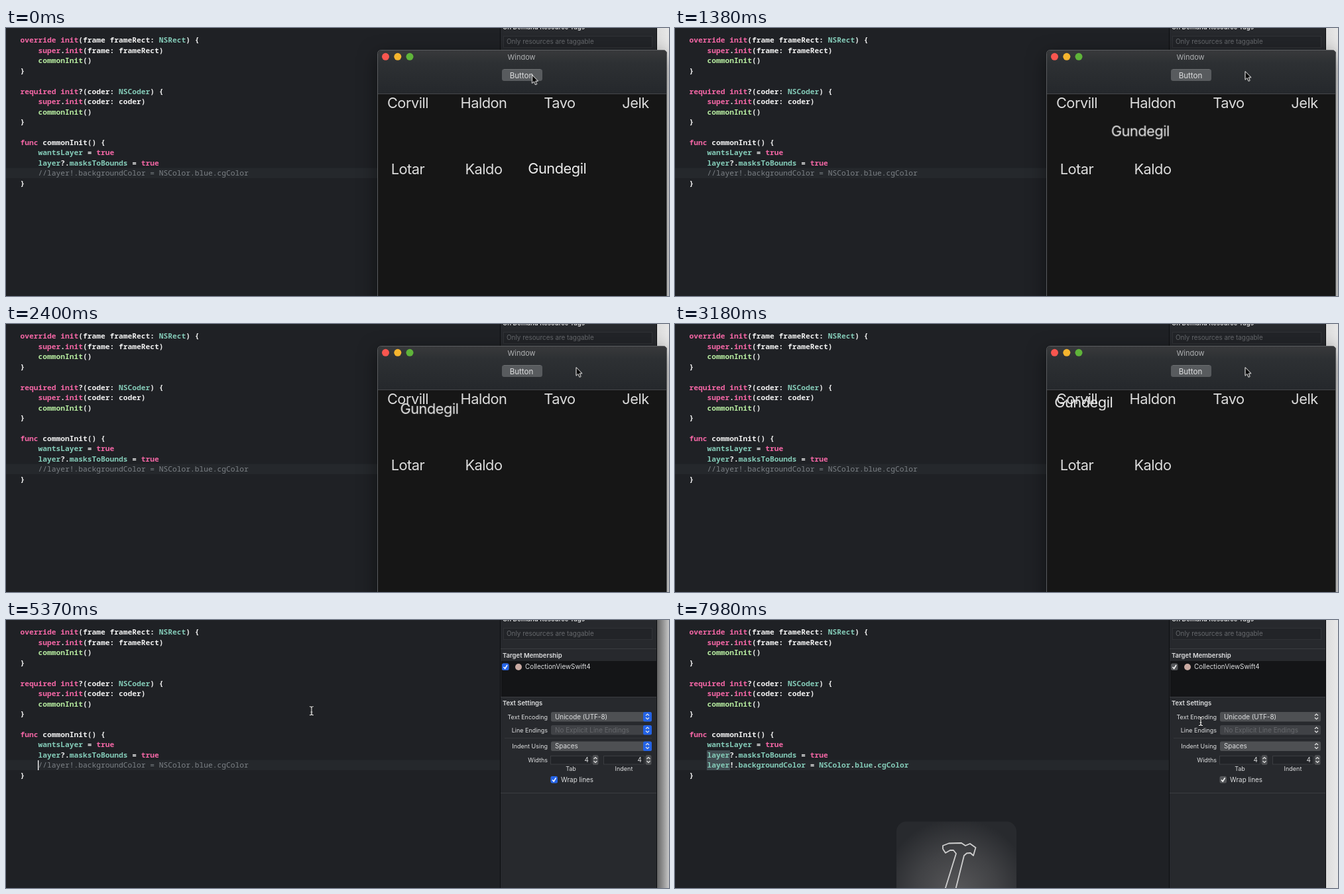
Recreate the animation shown at these times as an HTML page. Size 1000x405 px, loop 8000 ms.

```html
<!DOCTYPE html>
<html lang="en">
<head>
<meta charset="utf-8">
<title>Collection view editing</title>
<style>
html, body { margin: 0; width: 100%; height: 100%; overflow: hidden; background: #1f2125; }
svg { display: block; width: 1000px; height: 405px; }
text { font-family: Inter, "Open Sans", sans-serif; white-space: pre; fill: #dedfe0; }

.code text { font: 600 11.25px "Noto Sans Mono", "DejaVu Sans Mono", monospace; fill: #f0f0f0; }
.code .kw { fill: #f567a6; }
.code .sys { fill: #84cbb8; }
.code .call { fill: #b5ea9f; }
.code .note { fill: #7d8287; font-weight: 500; }

.head { font-size: 9.5px; font-weight: 600; }
.label { font-size: 9px; text-anchor: end; }
.caption { font-size: 9px; text-anchor: middle; }
.value { font-size: 9.9px; }
.dim { fill: #66686c; }
.mid { text-anchor: middle; }
.names text { font-size: 21.8px; letter-spacing: -.5px; text-anchor: middle; fill: #dcdcdc; }
.names .mover { fill: #ebebeb; }
.tick { fill: none; stroke: #fff; stroke-width: 1.5; }
.chevrons { fill: none; stroke: #e6e6e6; stroke-width: 1.2; }

.appWindow, .commented, .arrow, .uncommented, .active, .beam, .symbols, .bezel, .oldName {
  animation: 8s step-end infinite;
}
.appWindow, .arrow { animation-name: untilQuit; }
.beam { animation-name: afterQuit; }
.active { animation-name: focused; }
.commented { animation-name: beforeEdit; }
.uncommented { animation-name: afterEdit; }
.symbols { animation-name: symbolMatch; }
.oldName { animation-name: replaced; }
.bezel { animation-name: buildDone; animation-timing-function: linear; }
.pointer { animation: pointer 8s ease-in-out infinite; }
.mover { animation: travel 8s -135ms infinite; }

@keyframes untilQuit { 0% { opacity: 1 } 66.25%, 100% { opacity: 0 } }
@keyframes afterQuit { 0% { opacity: 0 } 66.25%, 100% { opacity: 1 } }
@keyframes focused { 0% { opacity: 0 } 66.25% { opacity: 1 } 97.5%, 100% { opacity: 0 } }
@keyframes beforeEdit { 0% { opacity: 1 } 76.25%, 100% { opacity: 0 } }
@keyframes afterEdit { 0% { opacity: 0 } 76.25%, 100% { opacity: 1 } }
@keyframes symbolMatch { 0% { opacity: 0 } 79%, 100% { opacity: 1 } }
@keyframes replaced { 0% { opacity: 1 } 54.6%, 100% { opacity: 0 } }
@keyframes buildDone { 0%, 93.5% { opacity: 0 } 95%, 100% { opacity: 1 } }
@keyframes pointer {
  0%, 3.1% { transform: translate(793.5px, 71px) }
  10%, 60% { transform: translate(860px, 65.5px) }
  72.5%, 83.75% { transform: translate(217px, 181px) }
  93.75%, 100% { transform: translate(793px, 153px) }
}
@keyframes travel {
  0% { transform: translate(835px, 221.3px); animation-timing-function: ease }
  56.25%, 100% { transform: translate(606px, 121.3px) }
}
</style>
</head>
<body>
<svg viewBox="0 0 1000 405">
  <defs>
    <linearGradient id="desk">
      <stop stop-color="#dcdcdc"/><stop offset="1" stop-color="#e8e8e8"/>
    </linearGradient>
    <linearGradient id="deskShade">
      <stop stop-color="#000" stop-opacity=".55"/><stop offset="1" stop-color="#000" stop-opacity=".14"/>
    </linearGradient>
    <linearGradient id="bar" x2="0" y2="1">
      <stop stop-color="#38393b"/><stop offset=".3" stop-color="#2d3033"/><stop offset="1" stop-color="#25282c"/>
    </linearGradient>
    <radialGradient id="glass" gradientUnits="userSpaceOnUse" cx="425" cy="412" r="112">
      <stop stop-color="#58585a"/><stop offset=".55" stop-color="#414245"/><stop offset="1" stop-color="#282a2e"/>
    </radialGradient>
    <filter id="shadow" x="-15%" y="-15%" width="130%" height="130%">
      <feDropShadow dx="0" dy="8" stdDeviation="14" flood-color="#000" flood-opacity=".5"/>
    </filter>
    <path id="ibeam" d="M-3-6.5Q0-6.5 0-4.5Q0-6.5 3-6.5M0-4.5V4.5M-3 6.5Q0 6.5 0 4.500Q0 6.5 3 6.5M-1.5 2H1.5"/>
  </defs>

  <rect width="745" height="405" fill="#1f2125"/>
  <rect y="211.5" width="745" height="15.5" fill="#25282c"/>
  <path class="symbols" d="M48 197h35v30h-35z" fill="#414d52"/>
  <g class="code" id="code"></g>
  <rect class="active" x="48" y="212" width="1.3" height="15" fill="#fff"/>

  <g class="bezel">
    <rect x="334" y="304.5" width="181" height="181" rx="15" fill="url(#glass)"/>
    <path d="M404 346 404 341 413 337.5 432 337 438 341 445 338 453.5 344 450 356 445.5 352 440 352.5 436 356 423 408M404 346 408 352 415 348 420 348 424 353 407 408"
      fill="none" stroke="#cfcfcf" stroke-width="1.8" stroke-linejoin="round"/>
  </g>

  <g>
    <rect x="745" width="237" height="405" fill="#27292d"/>
    <path d="M745.5 0V405M981.5 0V405" stroke="#0d0e10"/>
    <rect x="750.5" y="12.5" width="224" height="17" fill="#222428" stroke="#303236"/>
    <rect x="747" y="62" width="234" height="54" fill="#141517"/>
    <path d="M746 43.5H981M746 116.5H981M746 261.5H981" stroke="#3b3d41"/>
    <path d="M752 178.5H974" stroke="#35373b"/>
    <text class="head" x="749" y="2">On Demand Resource Tags</text>
    <text class="value dim" x="755" y="24">Only resources are taggable</text>
    <text class="head" x="749" y="57">Target Membership</text>
    <circle cx="773" cy="71" r="5" fill="#c9aaa2"/>
    <text class="value" x="783" y="74.3">CollectionViewSwift4</text>
    <text class="head" x="749" y="129">Text Settings</text>
    <text class="label" x="817" y="149.5">Text Encoding</text>
    <text class="label" x="817" y="169.5">Line Endings</text>
    <text class="label" x="817" y="194">Indent Using</text>
    <text class="label" x="817" y="214.5">Widths</text>
    <text class="caption" x="852" y="227.5">Tab</text>
    <text class="caption" x="932" y="227.5">Indent</text>
    <text class="value" x="837" y="245">Wrap lines</text>
    <g id="controls"></g>
  </g>

  <rect x="982" width="18" height="405" fill="url(#desk)"/>
  <rect class="active" x="982" width="18" height="405" fill="url(#deskShade)"/>

  <g class="appWindow">
    <path d="M560.5 420V38.5a5 5 0 0 1 5-5H992a5 5 0 0 1 5 5V420z" fill="#151618" filter="url(#shadow)"/>
    <path d="M561 99V39a5 5 0 0 1 5-5H991.5a5 5 0 0 1 5 5V99z" fill="url(#bar)"/>
    <path d="M561 99.5H996" stroke="#45474a"/>
    <path d="M560.5 410V38.5a5 5 0 0 1 5-5H991.5a5 5 0 0 1 5 5V410" fill="none" stroke="#5a5c5f"/>
    <circle cx="572.5" cy="43.3" r="5.5" fill="#f9564f"/>
    <circle cx="590.8" cy="43.3" r="5.5" fill="#f5b52e"/>
    <circle cx="609" cy="43.3" r="5.5" fill="#5fb43a"/>
    <text class="mid" x="777.5" y="47.5" font-size="11" style="fill:#aeb0b2">Window</text>
    <rect x="748" y="62" width="61" height="18" rx="3.5" fill="#585b5e"/>
    <path d="M751 62.5H806" stroke="#6c6e70"/>
    <text class="mid" x="777.5" y="75.5" font-size="11.6">Button</text>
    <g class="names" id="names"></g>
  </g>

  <g class="pointer">
    <path class="arrow" d="M0 0V12.6L2.9 9.9 5 14.8 7.200 13.800 5.100 9.200H9z" fill="#000" stroke="#fff"/>
    <g class="beam" fill="none">
      <use href="#ibeam" stroke="#000" stroke-width="2.6"/>
      <use href="#ibeam" stroke="#fff" stroke-width="1.2"/>
    </g>
  </g>
</svg>

<script>
const byId = id => document.getElementById(id);

// Code editor
const lines = [
  'override init(frame frameRect: NSRect) {',
  '    super.init(frame: frameRect)',
  '    commonInit()',
  '}',
  '',
  'required init?(coder: NSCoder) {',
  '    super.init(coder: coder)',
  '    commonInit()',
  '}',
  '',
  'func commonInit() {',
  '    wantsLayer = true',
  '    layer?.masksToBounds = true',
  '',
  '}'
];
const statement = '    layer!.backgroundColor = NSColor.blue.cgColor';

const span = kind => match => `<tspan class="${kind}">${match}</tspan>`;
const paint = line => line
  .replace(/\b(override|required|init|super|func|true)\b/g, span('kw'))
  .replace(/\b(NSRect|NSCoder|NSColor|wantsLayer|layer|masksToBounds|backgroundColor|blue|cgColor)\b/g, span('sys'))
  .replace(/^ +commonInit/, span('call'));
const codeLine = (html, row, kind = '') =>
  `<text class="${kind}" x="21.5" y="${22.4 + 15.45 * row}">${html}</text>`;

byId('code').innerHTML =
  lines.map((line, row) => codeLine(paint(line), row)).join('') +
  codeLine(statement.replace('layer', '//layer'), 13, 'note commented') +
  codeLine(paint(statement), 13, 'uncommented');

// Inspector controls: grey base with the accent colour while focused
const accent = '#2463e6';
const box = (x, y, w, h, fill, kind = '') =>
  `<rect class="${kind}" x="${x}" y="${y}" width="${w}" height="${h}" rx="2.5" fill="${fill}"/>`;
const chevrons = (x, y) =>
  `<path class="chevrons" d="M${x - 2.5} ${y - 1.5}l2.5-2.5 2.5 2.5m-5 3l2.5 2.5 2.5-2.5"/>`;
const popup = (y, label, fill, kind = '') =>
  box(822, y - 7, 152, 14.5, fill) + box(961, y - 7, 13, 14.5, accent, 'active') +
  chevrons(967.5, y) + `<text class="value ${kind}" x="828" y="${y + 3.7}">${label}</text>`;
const checkbox = (x, y) =>
  box(x, y, 10.5, 10.5, '#55575a') + box(x, y, 10.5, 10.5, accent, 'active') +
  `<path class="tick" d="M${x + 2.5} ${y + 5.5}l2.2 2.5 3.3-5.5"/>`;
const numberField = x =>
  `<rect x="${x + .5}" y="205.5" width="61" height="12.5" fill="#222428" stroke="#3b3d41"/>` +
  `<text class="value" x="${x + 58}" y="215.3" text-anchor="end">4</text>` +
  box(x + 63.5, 204, 9, 15, '#4d4f52') + chevrons(x + 68, 211.5);

byId('controls').innerHTML =
  checkbox(748, 65.5) + checkbox(821.5, 236) +
  popup(146, 'Unicode (UTF-8)', '#4e5053') +
  popup(166, 'No Explicit Line Endings', '#404246', 'dim') +
  popup(190.5, 'Spaces', '#4e5053') +
  numberField(821) + numberField(901);

// Name grid
const names = ['Corvill', 'Haldon', 'Tavo', 'Jelk', 'Lotar', 'Kaldo'];
byId('names').innerHTML = names.map((name, i) =>
  `<text class="${i ? '' : 'oldName'}" x="${606 + 114.5 * (i % 4)}" y="${121.3 + 100 * (i >> 2)}">${name}</text>`
).join('') + '<text class="mover">Gundegil</text>';
</script>
</body>
</html>
```
